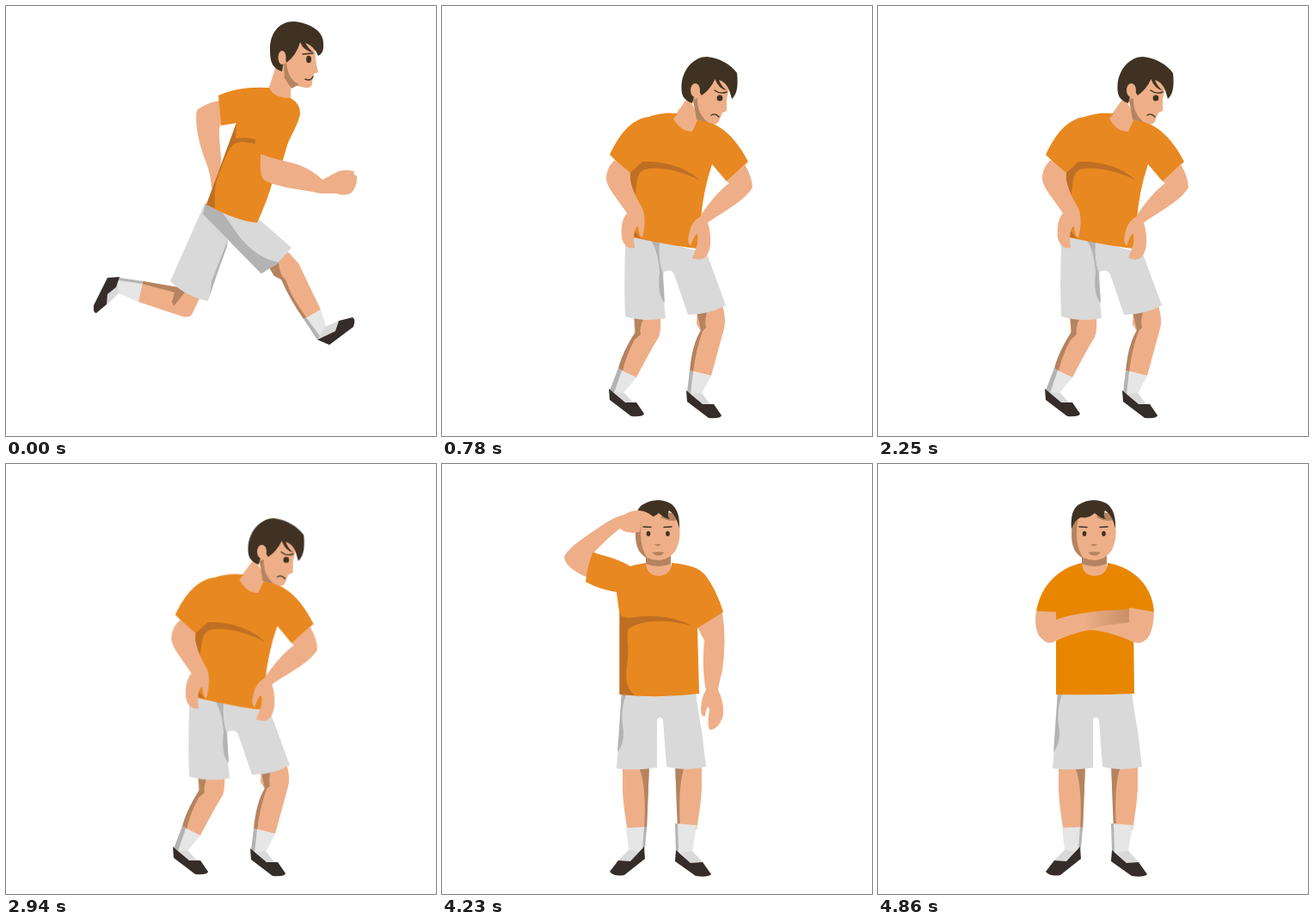
Recreate the animation shown at these times as an HTML page without scripts. Size 500 by 500 pixels, loop 6300 ms.

```html
<!DOCTYPE html>
<html lang="en">
<head>
<meta charset="utf-8">
<title>Runner catching his breath</title>
<style>
  html, body { margin: 0; width: 100%; height: 100%; overflow: hidden; background: #fff; }
  svg { display: block; width: 100%; height: 100%; }

  .skin { fill: #eeaf88; }
  .tan { fill: #b5835f; }
  .shirt { fill: #e88820; }
  .bright { fill: #e88600; }
  .fold { fill: #bf6f24; }
  .cloth { fill: #d9d9d9; }
  .grey { fill: #b3b3b3; }
  .sock { fill: #e6e6e6; }
  .dark { fill: #352d2a; }
  .hair { fill: #3f3223; }
  .line { fill: none; stroke: #3f3223; stroke-width: 1.4; stroke-linecap: round; }

  /* one 6.3 s timeline shared by every part */
  .scene, .move { animation: 6300ms linear infinite; }
  .scene { visibility: hidden; animation-timing-function: step-end; }
  .run { animation-name: run; }
  .rest { animation-name: rest; }
  .stand { animation-name: stand; }
  .salute { animation-name: salute; }
  .cross { animation-name: cross; }
  @keyframes run { 0% { visibility: visible; } .47%, 100% { visibility: hidden; } }
  @keyframes rest { 0% { visibility: hidden; } .47% { visibility: visible; } 62.8%, 100% { visibility: hidden; } }
  @keyframes stand { 0% { visibility: hidden; } 62.8%, 100% { visibility: visible; } }
  @keyframes salute { 0% { visibility: hidden; } 62.8% { visibility: visible; } 77.1%, 100% { visibility: hidden; } }
  @keyframes cross { 0% { visibility: hidden; } 77.1%, 100% { visibility: visible; } }

  /* breathing: 1.5 s per breath */
  .breath { animation-timing-function: cubic-bezier(.37, 0, .63, 1); }
  .torso { animation-name: torso; transform-origin: 260px 275px; }
  .hips { animation-name: hips; }
  @keyframes torso {
    0%, .476%, 24.286%, 48.095%, 71.905%, 100% { transform: translateY(3.5px) rotate(1deg); }
    12.381%, 36.19%, 60% { transform: none; }
  }
  @keyframes hips {
    0%, .476%, 24.286%, 48.095%, 71.905%, 100% { transform: translateY(2.5px); }
    12.381%, 36.19%, 60% { transform: none; }
  }

  /* arm swings out, up to the brow, and back down */
  .swing { animation-timing-function: ease-in-out; }
  .upper { animation-name: upper; transform-origin: 212px 130px; }
  .fore { animation-name: fore; transform-origin: 157px 110px; }
  @keyframes upper {
    0%, 62.6% { transform: rotate(-95deg); }
    67.14% { transform: none; }
    70% { transform: rotate(1deg); }
    76.7%, 100% { transform: rotate(-95deg); }
  }
  @keyframes fore {
    0%, 62.6% { transform: rotate(-132deg); }
    67.14% { transform: none; }
    70% { transform: rotate(-1deg); }
    76.7%, 100% { transform: rotate(-132deg); }
  }
</style>
</head>
<body>
<svg viewBox="0 0 500 500">
  <defs>
    <linearGradient id="sleeveShade">
      <stop offset="0" stop-color="#c98f68" stop-opacity="0"/>
      <stop offset="1" stop-color="#c98f68"/>
    </linearGradient>
    <path id="bentShoe" class="dark" d="M194 445L213 461H226L235 474Q234 478 220 477L195 458Z"/>
    <g id="leg">
      <path class="skin" d="M210 350H241Q241 370 239 380L237 428H216Q211 400 210 380Z"/>
      <path class="tan" d="M230 350H241Q240 370 240 380L238 428H235Q238 376 230 355Z"/>
    </g>
  </defs>

  <g class="scene run">
    <!-- back arm and legs -->
    <path class="skin" d="M222 121Q232 113 248 110L250 137C246 142 249 160 250 175Q251 190 243 210L239 212Q238 195 232 180C224 160 219 135 222 121Z"/>
    <path class="skin" d="M159 320L200 327 226 338 217 357Q215 363 205 361L154 344Z"/>
    <path class="tan" d="M159 320L200 327 208 333 195 349 193 344 196 333 158 323Z"/>
    <path class="sock" d="M131 316L159 320 154 344 131 334 118 347V335Z"/>
    <path class="grey" d="M131 316L159 320 158 323 131 319Z"/>
    <path class="cloth" d="M130 322L131 334 117 347V335Z"/>
    <path class="dark" d="M118 316L132 315 128 327 118 335 117 347 105 357Q101 357 102 348Z"/>
    <path class="skin" d="M306 304L328 286 340 299 366 353 347 364Q332 337 320 318L311 313Z"/>
    <path class="tan" d="M306 304L317 298Q318 313 325 318 331 337 349 362L346 364Q330 341 320 318L312 314Z"/>
    <path class="sock" d="M347 364L366 353 372 372 365 387 362 388Z"/>
    <path class="grey" d="M346 364L349 362 365 384 362 388Z"/>
    <path class="cloth" d="M371 373L387 366 383 378 363 387Z"/>
    <path class="dark" d="M362 388L383 378 387 366 403 362Q407 364 404 373L376 394Z"/>
    <path class="cloth" d="M231 230L293 247 332 281 315 300 296 311 258 272 235 343Q211 339 191 320Z"/>
    <path class="grey" d="M232 229L229 242 297 311 318 298C297 295 280 280 269 265Q257 247 250 238ZM258 272L239 320 237 337Q241 323 257 280Z"/>
    <!-- head -->
    <path class="skin" d="M314 70L305 97Q315 108 331 108V94L326 70Z"/>
    <path class="skin" d="M322 50L344 36 358 44 361 68 363 77 358 79 356 88Q357 96 348 95L334 92 322 75Z"/>
    <path class="tan" d="M323 68L324 84 332 96 341 91Q328 86 326 66Z"/>
    <path class="hair" d="M321 76C308 72 307 62 307 50 307 30 319 18 334 18 352 19 370 29 369 44Q370 55 363 58 358 46 348 43 352 50 357 54 346 52 342 42 338 57 326 66L324 56Z"/>
    <ellipse class="skin" cx="321" cy="60" rx="4.5" ry="8"/>
    <ellipse class="hair" cx="352" cy="62" rx="3" ry="4.2"/>
    <path class="line" d="M345 56L357 55M348 85Q354 88 357 82"/>
    <!-- shirt and front arm -->
    <path class="shirt" d="M247 104Q270 93 306 95 311 107 331 107 343 114 342 126C338 142 330 152 327 162L322 179 310 204Q304 226 292 252 268 250 233 231L268 136 250 139Z"/>
    <path class="fold" d="M268 136L233 231 243 235C242 219 243 203 250 190 257 172 260 158 275 158L290 160V155Q281 152 267 154Z"/>
    <path class="skin" d="M296 172C315 179 330 181 341 185Q357 191 368 202 379 196 387 192 396 190 405 192L404 195 408 198Q409 208 402 217 394 222 384 218L365 218C345 213 320 212 303 204 294 200 296 185 296 172Z"/>
  </g>

  <g class="scene rest">
    <!-- legs -->
    <path class="skin" d="M223 358L254 360Q255 378 252 385 241 403 226 432L206 423C213 406 223 390 224 378Z"/>
    <path class="tan" d="M223 358L235 362Q229 374 231 382L224 388Q214 406 210 425L205 422C209 405 220 386 225 379Z"/>
    <path class="sock" d="M206 422L226 432 211 450 217 462 195 449Z"/>
    <path class="grey" d="M205 421L209 424 200 450 195 447Z"/>
    <path class="cloth" d="M200 449L212 450 222 461H212Z"/>
    <path class="skin" d="M297 352L326 348Q331 365 328 375L313 430 289 424Q295 392 301 378L296 370Z"/>
    <path class="tan" d="M296 355L308 356Q305 368 307 374L303 378Q295 400 292 426L288 424Q291 393 301 377Z"/>
    <path class="sock" d="M288 424L313 430 302 451 307 464 286 450Z"/>
    <path class="grey" d="M288 424L292 425 289 452 285 449Z"/>
    <path class="cloth" d="M290 451L302 450 312 463H302Z"/>
    <use href="#bentShoe"/>
    <use href="#bentShoe" x="90" y="2"/>
    <g class="move breath hips">
      <path class="cloth" d="M214 262L308 288 330 348Q310 359 286 359L270 312Q266 305 258 309 255 320 260 363 237 368 213 361 211 315 214 262Z"/>
      <path class="grey" d="M241 270L253 273Q251 295 257 312L259 345Q250 337 253 309 251 282 241 270Z"/>
    </g>
    <g class="move breath torso">
      <!-- head -->
      <path class="skin" d="M286 106L268 131Q278 146 293 147L301 131Z"/>
      <path class="skin" d="M296 92L318 78 335 92 331 108 331 122 326 124 323 131Q322 138 314 138L300 132 291 110Z"/>
      <path class="tan" d="M292 109L296 132 313 138Q296 127 297 107Z"/>
      <path class="hair" d="M291 113C280 109 278 103 278.500 92 280 72 294 59 308 59 322 60 336 68 343 78 345 95 342 104 337 108L334 98Q330 88 322 86 325 94 331 98 322 97 317.500 85 312 97 302 104L296 95Z"/>
      <ellipse class="skin" cx="294.500" cy="98" rx="5.500" ry="8"/>
      <ellipse class="hair" cx="323" cy="107" rx="3.400" ry="3.600"/>
      <path class="line" d="M317 98Q323 103 331 100M313 127Q318 124 322 129"/>
      <!-- shirt -->
      <path class="shirt" d="M195 173C205 151 220 131 240 129Q256 123 274 125L269 131Q278 146 291 146L297 133C314 134 336 142 356 181L331 204 314 184Q303 217 301 250L297 282Q268 279 217 268V194Z"/>
      <path class="fold" d="M233 181C260 180 285 188 300 203 279 191 250 186 236 190 226 194 227 203 225 218L216 242 219 194ZM224 262L231 270 221 268Z"/>
      <!-- arms -->
      <path class="skin" d="M201 179L219 194C217 205 225 222 233 235 237 245 236 258 233 269Q229 269 228 256 221 260 224 281 213 284 209 270 207 250 215 241C205 225 190 210 191 199 192 190 195 184 201 179Z"/>
      <path class="skin" d="M331 204L352 184Q361 200 361 211C352 227 325 240 309 252 314 268 314 287 304 294Q297 296 291 293L297 277Q299 252 289 279 284 275 288 262 290 251 300 245C311 228 322 215 334 206Z"/>
    </g>
  </g>

  <g class="scene stand">
    <use href="#leg"/>
    <use href="#leg" transform="matrix(-1 0 0 1 512 -3)"/>
    <!-- feet -->
    <path class="sock" d="M214 423L238 422 236 448 219 462 205 461 217 449ZM272 418L296 420 291 450 304 464 290 465 272 450Z"/>
    <path class="grey" d="M235 422H238L236 446 233 449ZM271 418H274L275 452 272 450Z"/>
    <path class="cloth" d="M217 449L230 450 219 462 205 461ZM278 452L291 450 304 464 290 465Z"/>
    <path class="dark" d="M195 474L205 461 219 462 235 445 236 459 212 478Q200 480 195 474ZM313 477L303 463 289 464 272 449 271 462 295 479Q309 481 313 477Z"/>
    <path class="cloth" d="M209 264H295Q298 290 302 310L307 352Q283 358 261 352L257 297Q253 292 250 297V353Q225 357 203 354 207 310 209 264Z"/>
    <path class="grey" d="M209 264H216Q206 285 211 310 212 325 204 335Z"/>
    <!-- head -->
    <path class="skin" d="M237 105H266V127Q252 134 237 127Z"/>
    <path class="tan" d="M237 106H266V116Q252 122 237 116Z"/>
    <path class="skin" d="M226 75Q228 55 250 53 272 54 276 72 278 84 274 95 269 110 252 112 236 111 229 101 225 90 226 75Z"/>
    <path class="tan" d="M226 68L233 62Q227 92 239 110 224 102 225 80ZM254 62Q263 53 271 59L273 65Q266 68 254 62Z"/>
    <path class="hair" d="M225 76Q223 56 232 48 249 37 266 46 277 54 276 75 273 60 264 54 261 60 265 64 258 63 252 57 245 64 236 62 229 64 225 76Z"/>
    <ellipse class="hair" cx="240" cy="81" rx="2.300" ry="3"/>
    <ellipse class="hair" cx="262.500" cy="81" rx="2.300" ry="3"/>
    <path class="line" d="M234 73L243 73.500M258 73.500L267 73"/>
    <path class="tan" d="M247 93H255L251 96ZM244 103Q251 101 259 103 252 110 244 103Z"/>
  </g>

  <g class="scene salute">
    <path class="skin" d="M297 190L326 172Q331 205 326 240 322 255 321 263 328 275 327 292 322 309 311 309 308 303 311 285 308 278 306 293 301 296 301 284 302 270 307 263 302 240 305 205Z"/>
    <path class="shirt" d="M212 121Q223 117 237 115 238 130 252 130 266 130 267 115C288 117 299 121 306 129Q319 146 327 172L297 191 299 267Q252 273 206.500 268V175L203 150Z"/>
    <path class="fold" d="M206.500 173Q209 181 225 178C255 175 275 180 290 188 262 180 230 181 217 192 213 200 219 208 215 235Q211 257 224 269L206.500 268Z"/>
    <g class="move swing upper">
      <path class="skin" d="M180 104Q165 96 152 98L145 116Q155 127 172 133Z"/>
      <g class="move swing fore">
        <path class="skin" d="M168 130Q145 122 142 109C145 98 166 85 185 72Q201 61 212 59C222 52 233 53 241 58L250 64Q246 68 232 67L230 79Q215 82 207 75 190 88 176 104Z"/>
      </g>
      <path class="shirt" d="M175 103Q205 110 219 119 235 132 224 143L210 150Q185 147 167 137 169 119 175 103Z"/>
    </g>
  </g>

  <g class="scene cross">
    <path class="bright" d="M184 172C189 141 210 121 237 115Q238 130 252 130 266 130 267 115C298 120 320 143 321 173L297 180 298 267Q252 269 207 268V180Z"/>
    <path class="skin" d="M184 171L207 172V181C230 173 265 169 291 170L293 167 321 172Q320 207 303 208 297 208 290 204C275 198 260 193 245 193Q225 197 206 206 199 210 194 206 180 198 184 171Z"/>
    <path fill="url(#sleeveShade)" d="M238 193Q265 187 292 184V169Q262 170 238 174Z"/>
  </g>
</svg>
</body>
</html>
```
